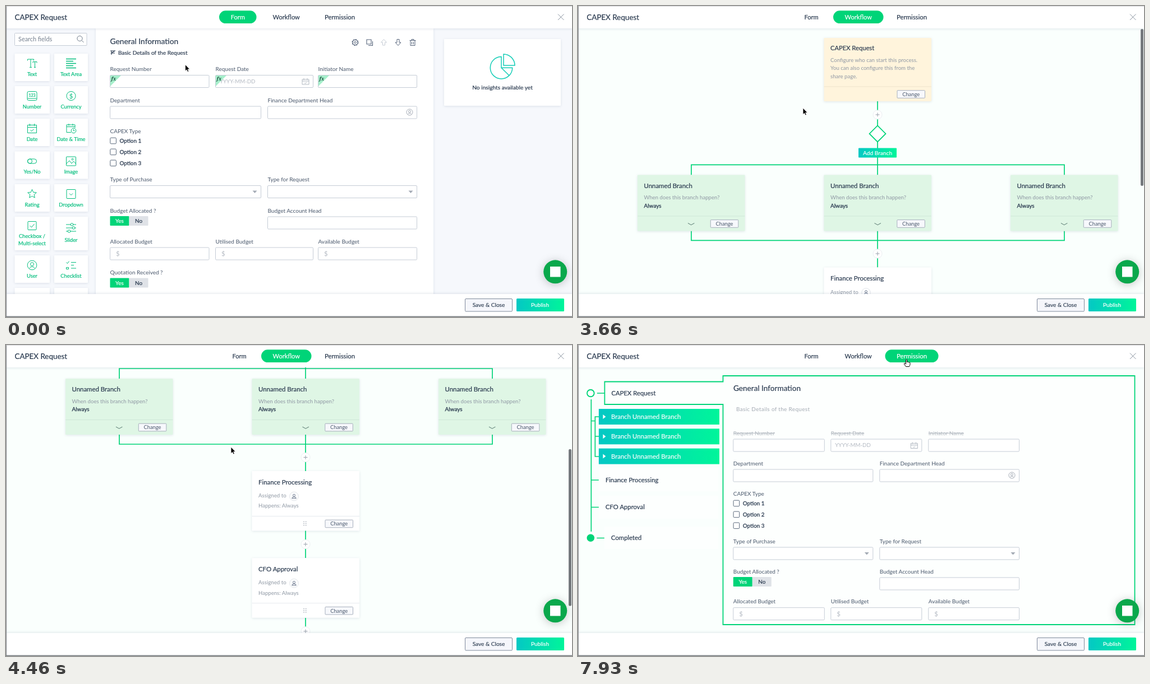
An HTML page that plays this animation: 1009 px wide and 555 px high, repeating every 10000 ms.

```html
<!DOCTYPE html>
<html lang="en">
<head>
<meta charset="utf-8">
<title>CAPEX Request</title>
<style>
html, body { margin: 0; width: 100%; height: 100%; overflow: hidden; background: #fff; }
svg { display: block; width: 1009px; height: 555px; }
text { font-family: Lato, "Open Sans", sans-serif; }
.sh { filter: drop-shadow(0 1px 2px rgba(60, 80, 110, .14)); }
</style>
</head>
<body>
<svg id="stage" viewBox="0 0 1009 555" xmlns="http://www.w3.org/2000/svg"></svg>
<script>
const INK = '#2b3b50', LABEL = '#4a586c', GREY = '#8f98a4', EDGE = '#c5ccd6',
      GREEN = '#00d478', ICON = '#00bd7c';

// ---- drawing helpers ----
const rect = (x, y, w, h, fill, stroke = 'none', r = 0, more = '') =>
  `<rect x="${x}" y="${y}" width="${w}" height="${h}" rx="${r}" fill="${fill}" stroke="${stroke}" ${more}/>`;
const path = (d, stroke, w = 1, fill = 'none') =>
  `<path d="${d}" stroke="${stroke}" stroke-width="${w}" fill="${fill}"/>`;
const circle = (x, y, r, fill, stroke = 'none', w = 1) =>
  `<circle cx="${x}" cy="${y}" r="${r}" fill="${fill}" stroke="${stroke}" stroke-width="${w}"/>`;
const at = (x, y, s, more = '') => `<g transform="translate(${x} ${y})" ${more}>${s}</g>`;
// y is the middle of the capitals; o.b is extra weight, o.mid centres
const text = (x, y, s, size, fill = INK, o = {}) =>
  `<text x="${x}" y="${y + size * .36}" font-size="${size}" fill="${fill}"` +
  (o.b ? ` stroke="${fill}" stroke-width="${o.b}"` : '') +
  (o.mid ? ' text-anchor="middle"' : '') + (o.more ? ' ' + o.more : '') + `>${s}</text>`;
const group = (id, s, more = '') => `<g id="${id}" ${more}>${s}</g>`;

const calendar = c => path('M-6 -4H6V5H-6ZM-6 -1H6M-3 -6V-3M3 -6V-3M-2 2L-.5 3.3L2 1', c, .9);
const person = (c, r) => circle(0, 0, r, 'none', c) + circle(0, -r * .22, r * .36, 'none', c) +
  path(`M${-r * .6} ${r * .68}Q0 ${-r * .1} ${r * .6} ${r * .68}`, c);

// ---- form ----
const field = (x, y, w) => rect(x, y, w, 22, '#fff', EDGE, 1.5);
const fx = (x, y) => path(`M${x + .5} ${y + .5}h19l-19 19z`, 'none', 0, '#a6efcb') +
  `<text x="${x + 2}" y="${y + 9.5}" font-size="8.5" font-weight="700" font-style="italic" fill="#1d5040" style="font-family:'Noto Serif',serif">fx</text>`;
const toggle = (x, y) => rect(x, y, 34, 17, GREEN, 'none', 1) + rect(x + 34, y, 34, 17, '#dfe2e7', 'none', 1) +
  text(x + 17, y + 8.5, 'Yes', 10, '#fff', { mid: 1, b: .2 }) + text(x + 51, y + 8.5, 'No', 10, INK, { mid: 1, b: .2 });

function formBody(thirds, halves, rows, locked) {
  const label = (x, y, s, strike) => text(x, y, s, 10, strike ? '#b0b6be' : LABEL,
    strike ? { more: 'text-decoration="line-through"' } : {});
  const caret = (x, y) => path(`M${x - 4} ${y - 2}h8l-4 4.5z`, 'none', 0, '#a3aab4');
  const [a, b] = halves, left = a[0];
  let s = '';
  thirds.forEach(([x, w], i) => {
    const y = rows[0] + 11;
    s += label(x, rows[0], ['Request Number', 'Request Date', 'Initiator Name'][i], locked) + field(x, y, w);
    if (i == 1) s += text(x + 7.5, y + 11, 'YYYY-MM-DD', 9.7, '#b4bac3') + at(x + w - 13.5, y + 11.5, calendar('#aab1bb'));
    if (!locked) s += fx(x, y);
    s += label(x, rows[5], ['Allocated Budget', 'Utilised Budget', 'Available Budget'][i]) +
      field(x, rows[5] + 11, w) + text(x + 10.5, rows[5] + 22, '$', 11.5, '#b4bac3');
  });
  halves.forEach(([x, w], i) => {
    s += label(x, rows[1], ['Department', 'Finance Department Head'][i]) + field(x, rows[1] + 11, w) +
      label(x, rows[3], ['Type of Purchase', 'Type for Request'][i]) + field(x, rows[3] + 11, w) +
      caret(x + w - 11, rows[3] + 22);
  });
  s += at(b[0] + b[1] - 13, rows[1] + 21.5, person('#a3aab4', 5.5));
  s += label(left, rows[2], 'CAPEX Type');
  [17.5, 37.4, 57.3].forEach((d, i) => {
    s += rect(left + .3, rows[2] + d - 5.3, 10.6, 10.6, '#fff', '#59677a', 1.5) +
      text(left + 17, rows[2] + d - .3, 'Option ' + (i + 1), 9.9, INK, { b: .28 });
  });
  s += label(left, rows[4], 'Budget Allocated ?') + toggle(left, rows[4] + 10) +
    label(b[0], rows[4], 'Budget Account Head') + field(b[0], rows[4] + 11, b[1]);
  if (rows[6]) s += label(left, rows[6], 'Quotation Received ?') + toggle(left, rows[6] + 10);
  return s;
}

const tools = [
  ['Text', path('M-8 -5V-7.5H3V-5M-2.5 -7.5V7M-4.5 7H-.5M1.5 -1V-3H8.5V-1M5 -3V7M3.5 7H6.5', ICON)],
  ['Text Area', path('M-9 -8H9M-9 -4H4M-9 0H9M-9 4H4M-9 8H9', ICON, 1.5)],
  ['Number', rect(-8.5, -8, 17, 16, 'none', ICON, 2.5) + path('M-8 4.5H8', ICON) + text(0, -1.5, '123', 7, ICON, { mid: 1, b: .2 })],
  ['Currency', circle(0, 0, 8, 'none', ICON) + text(0, 0, '$', 11.5, ICON, { mid: 1 })],
  ['Date', path('M-8 -6H8V8H-8ZM-8 -2H8M-4 -8.5V-4.5M4 -8.5V-4.5M-3 3L-.5 5L3 1', ICON)],
  ['Date &amp; Time', path('M0 7H-8V-6.5H7V-1M-8 -3H7M-4 -8.5V-5M3 -8.5V-5', ICON) + circle(4.5, 4, 4.3, '#fff', ICON) + path('M4.5 1.5V4H6.5', ICON)],
  ['Yes/No', rect(-8, -4, 16, 8, 'none', ICON, 4) + circle(-4, 0, 4, 'none', ICON)],
  ['Image', rect(-8.5, -8, 17, 16, 'none', ICON, 1) + path('M-8 4L-3 -1L1 4L4.5 0L8 4', ICON) + circle(2.5, -3.5, 1.5, 'none', ICON)],
  ['Rating', path(Array.from({ length: 10 }, (_, i) => {
    const r = i % 2 ? 3.8 : 8.2, a = i * Math.PI / 5;
    return (i ? 'L' : 'M') + (r * Math.sin(a)).toFixed(2) + ' ' + (-r * Math.cos(a)).toFixed(2);
  }).join('') + 'Z', ICON)],
  ['Dropdown', rect(-8, -8, 16, 16, 'none', ICON, 1) + path('M-3 -1L0 2L3 -1', ICON)],
  ['Checkbox /|Multi-select', rect(-7.5, -7.5, 15, 15, 'none', ICON, 1) + path('M-4 0L-1 3L4 -3', ICON)],
  ['Slider', path('M-9 -6H-1M4 -6H9M-9 0H2M7 0H9M-9 6H-6M-1 6H9', ICON) + circle(1.5, -6, 2.3, 'none', ICON) + circle(4.5, 0, 2.3, 'none', ICON) + circle(-3.5, 6, 2.3, 'none', ICON)],
  ['User', person(ICON, 8.3)],
  ['Checklist', path('M-8.5 -5L-6.5 -3L-3.5 -7M0 -5H9M-8.5 4H-4.5V7H-8.5ZM0 5.5H9M0 0H5', ICON)]
];

function formPage() {
  let s = rect(0, 40, 1009, 475, '#f6f8fc') + rect(160, 40, 602, 475, '#fff', 'none', 0, 'class="sh"');
  s += rect(15.5, 48.5, 128.5, 22, '#fff', EDGE, 1) + text(22, 59.5, 'Search fields', 10.9, '#747f8e') +
    circle(131.5, 58, 4.6, 'none', '#6c7888') + path('M135 61.5L138.5 65', '#6c7888');
  const tops = [85, 143, 201, 259.5, 318, 376, 445, 503];
  tops.forEach((y, r) => [[15.5, 62.5], [86, 60]].forEach(([x, w], c) => {
    s += rect(x, y, w, r == 5 ? 60 : 49, '#fff', 'none', 1, 'class="sh"');
    const item = tools[r * 2 + c];
    if (!item) return;
    const cx = c ? 116 : 46.5, lines = item[0].split('|'), tall = r == 5 && c;
    s += at(cx, y + (tall ? 20 : r == 5 ? 16 : 17.5), item[1]);
    lines.forEach((l, i) => s += text(cx, y + (tall ? 41.5 : r == 5 ? 34.5 : 36.3) + i * 13.3, l, 9.3, ICON, { mid: 1, b: .2 }));
  }));
  s += text(185.5, 63.5, 'General Information', 13.8, INK, { b: .2 }) +
    path('M186 80H194L188 84H194M188 80V87', INK, 1.1) +
    text(200, 83, 'Basic Details of the Request', 10.1, INK, { b: .2 });
  s += at(622.5, 65, circle(0, 0, 4.6, 'none', '#55637a', 1.2) + circle(0, 0, 1.8, 'none', '#55637a') +
    `<circle r="5.4" fill="none" stroke="#55637a" stroke-width="1.2" stroke-dasharray="2.1 2.14"/>`);
  s += at(648, 65, path('M-5 -5H3V3H-5ZM5.5 -2V5.5H-2', '#55637a', 1.1)) +
    at(673.5, 65, path('M-2 5V0H-5L0 -5.5L5 0H2V5Z', '#c6ccd5')) +
    at(699, 65, path('M-2 -5.5V0H-5L0 5.5L5 0H2V-5.5Z', '#55637a')) +
    at(725, 65, path('M-5.5 -3.5H5.5M-2 -3.5V-5.5H2V-3.5M-4 -3.5V5.5H4V-3.5M-1.5 -1V3.5M1.5 -1V3.5', '#55637a'));
  s += formBody([[185.5, 176.5], [373.5, 174], [556.5, 176]], [[185.5, 269], [466.5, 266]],
    [112.5, 168, 223, 309.5, 365, 420, 475.5]);
  s += rect(781, 59, 208, 119, '#fff', 'none', 1, 'class="sh"') +
    path('M883 90.5A19.7 19.7 0 1 0 902.7 110.2H883ZM883 110.2L897 124M887 86V106H907A20 20 0 0 0 887 86Z', '#14cdb6', 1.5) +
    text(885, 145, 'No insights available yet', 10.2, INK, { mid: 1, b: .2 });
  return s + group('caret', rect(22, 54, 1, 11, '#222'));
}

// ---- workflow ----
const change = (x, y) => rect(x, y - 6.8, 49.5, 13.6, '#f7f8fc', '#a7afbc', 1) +
  text(x + 24.7, y, 'Change', 9.4, LABEL, { mid: 1 });
const plus = y => circle(534, y, 8, '#fff', '#eceff2') + path(`M530.5 ${y}h7M534 ${y - 3.5}v7`, '#9aa2ad');

function flowPage() {
  const box = (x, y, h, fill, div, line) => rect(x, y, 191.5, h, fill, 'none', 1, 'class="sh"') +
    path(`M${x} ${div}h191.5`, line);
  let s = path('M534 170V214M534 243V302M202 302V284H867V302M202 402V419H867V402M534 402V467M534 573V622M534 729V777', GREEN, 1.7);
  s += path('M534 214L548.5 228.5L534 243L519.5 228.5Z', GREEN, 1.7, '#fff') +
    rect(500, 254, 68, 17, 'url(#teal)', 'none', 1) + text(534, 262.5, 'Add Branch', 10.2, '#fff', { mid: 1, b: .15 });
  s += box(438.5, 57.5, 113, '#fff4dc', 144.5, '#efe4cc') + text(450, 76, 'CAPEX Request', 11.2, INK, { b: .2 });
  ['Configure who can start this process.', 'You can also configure this from the', 'share page.']
    .forEach((l, i) => s += text(450, 97.3 + i * 14.2, l, 9.6, GREY));
  s += change(569, 158);
  [106, 438.5, 771].forEach(x => {
    s += box(x, 302, 100, '#dff6e5', 375.5, '#cfe8d8') + text(x + 11.5, 321.3, 'Unnamed Branch', 11.4, INK, { b: .2 }) +
      text(x + 11.5, 342.5, 'When does this branch happen?', 9.6, GREY) +
      text(x + 11.5, 356.5, 'Always', 10, INK, { b: .3 }) +
      path(`M${x + 90} 388l5.7 3.2l5.7 -3.2`, '#6b8a80', 1.1) + change(x + 130.3, 389);
  });
  [['Finance Processing', 467], ['CFO Approval', 622.2]].forEach(([name, y]) => {
    s += box(438.5, y, 106.5, '#fff', y + 80.5, '#e6e9ee') + text(450, y + 19.8, name, 11.4, INK, { b: .2 }) +
      text(450, y + 43.8, 'Assigned to', 9.7, GREY) + text(450, y + 62, 'Happens: Always', 9.6, GREY) +
      at(513.5, y + 45, circle(0, 0, 7.8, '#fff', '#dfe3e8') + circle(0, -1.7, 2, 'none', '#66738a') +
        path('M-3.8 3.8Q-3.5 1 0 1Q3.5 1 3.8 3.8Z', '#66738a'));
    for (let i = 0; i < 6; i++) s += rect(530.5 + i % 2 * 3.5, y + 89.8 + (i >> 1) * 3.2, 1.3, 1.3, '#8a93a0');
    s += change(569, y + 94);
  });
  s += [194.5, 442.5, 597.5, 752.8].map(plus).join('');
  return s + rect(503.5, 777, 61.5, 20.5, '#fff', GREEN, 10.2) + text(534, 787, 'Completed', 10.3, '#00b96c', { mid: 1, b: .2 });
}

// ---- permission ----
function permPage() {
  let s = path('M258.5 65.5V55H992.5V499H258.5V106H47.5V65.5Z', GREEN, 1.8, '#fdfffe');
  s += rect(37, 220, 213, 41, '#fdfffe') + rect(37, 269, 213, 41, '#fdfffe') + rect(47, 324, 203, 40, '#fdfffe');
  s += path('M23.5 97V333M34 86H47M23 135.5H30.5M37 128H30.5V199H37M30.5 163H37M23 241H37M23 289.5H37M33 344.5H47', GREEN, 1.7);
  s += circle(22.5, 86, 11, '#fff') + circle(22.5, 86, 6.3, '#fff', GREEN, 1.9) +
    circle(22.5, 344.3, 11, '#fff') + circle(22.5, 344.3, 6.8, GREEN);
  [114, 149.3, 184.6].forEach(y => s += rect(37, y, 215, 28, 'url(#teal)') +
    path(`M44.5 ${y + 10}l5 4l-5 4z`, 'none', 0, '#fff') + text(59, y + 14, 'Branch Unnamed Branch', 11.4, '#fff', { b: .15 }));
  [['CAPEX Request', 59.5, 85.5], ['Finance Processing', 49, 240.5], ['CFO Approval', 49, 289], ['Completed', 59, 344]]
    .forEach(([l, x, y]) => s += text(x, y, l, 11.3, INK, { b: .2 }));
  s += text(277, 77, 'General Information', 13.6, INK, { b: .2 }) +
    text(282, 114.5, 'Basic Details of the Request', 10, '#a3aab3', { more: 'letter-spacing=".32"' });
  return s + formBody([[276.8, 162.5], [450.8, 162], [624.8, 161.7]], [[276.8, 249], [537.8, 248.7]],
    [157, 211, 265, 350, 404, 457.7], true);
}

// ---- frame around the pages ----
const tabs = [['Form', 380, 66.5, 416, 11.1], ['Workflow', 455, 89.5, 499.7, 11.1], ['Permission', 547.5, 95, 595, 11.4]];
const chrome = rect(0, 0, 1009, 40, '#fff', 'none', 0, 'class="sh"') +
  text(15.5, 20, 'CAPEX Request', 13.4, INK, { b: .2 }) + path('M984 14.5L994.5 25M994.5 14.5L984 25', '#8a94a0') +
  tabs.map(([l, x, w, cx, size], i) =>
    group('off' + i, text(cx, 19.7, l, size, INK, { mid: 1, b: .2 })) +
    group('on' + i, rect(x, 8.3, w, 22.8, GREEN, 'none', 11.4) + text(x + w / 2, 19.7, l, size, '#fff', { mid: 1, b: .2 }))).join('') +
  rect(0, 514, 1009, 41, '#fff', 'none', 0, 'style="filter:drop-shadow(0 -1px 2px rgba(60,80,110,.14))"') +
  rect(818.5, 522.5, 84, 22.5, '#f5f6fb', '#7f8a9b', 1.5) + text(860.5, 533.5, 'Save &amp; Close', 10.1, INK, { mid: 1, b: .15 }) +
  rect(910, 522, 85, 23, 'url(#teal)', 'none', 1.5) + text(952, 533.5, 'Publish', 10.1, '#fff', { mid: 1, b: .2 }) +
  `<g style="filter:drop-shadow(0 2px 8px rgba(0,0,0,.22))">${circle(979.2, 474.3, 21, '#0aa84c')}</g>` +
  rect(970, 465, 18.5, 18.5, '#fff') +
  path('M.6 0V555', '#8d9094', 1.2) + path('M0 .3H1009', '#b9bcbf', .7) + path('M0 554.2H1009', '#7d8185', 1.5);

const arrow = path('M0 0V11.6L2.6 9.2L4.3 13L6.3 12.1L4.6 8.5H8.1Z', '#fff', .8, '#000');
const hand = path('M-1 .8Q0 -.6 1 .8V5Q2.2 4 3 5.2Q4.4 4.4 5 5.8Q6.5 5.2 6.5 6.8V9Q6.2 11 5 13H-1L-4 8.6Q-4.5 6.6 -2.6 7L-1 8.6Z', '#000', 1, '#fff');

document.getElementById('stage').innerHTML =
  `<defs><linearGradient id="teal"><stop stop-color="#04c8c4"/><stop offset="1" stop-color="#00f59a"/></linearGradient>
  <clipPath id="view"><rect y="40" width="1009" height="474"/></clipPath></defs>` +
  rect(0, 0, 1009, 555, '#fafffd') +
  `<g clip-path="url(#view)">${group('form', formPage()) + group('flow', flowPage()) + group('perm', permPage())}</g>` +
  group('bar', rect(1003, 40.6, 5, 280, '#75797d', 'none', 2.5)) + chrome +
  group('mouse', group('arrow', arrow) + group('hand', hand));

// ---- motion ----
const ease = {
  out: p => 1 - (1 - p) * (1 - p),
  both: p => (1 - Math.cos(Math.PI * p)) / 2
};
// rows: [start, end, easing, ...values reached]
const track = (t, from, rows) => {
  let now = from;
  for (const [a, b, e, ...to] of rows) {
    if (t <= a) break;
    const p = ease[e](Math.min(1, (t - a) / (b - a)));
    now = now.map((v, i) => v + (to[i] - v) * p);
  }
  return now;
};
const moves = [
  [1140, 1660, 'both', 486.5, 44], [1660, 2000, 'out', 495.5, 19.5],
  [2940, 3200, 'both', 401, 182],
  [5530, 6600, 'both', 586.5, 26.5],
  [7455, 7456, 'both', 586.5, 25.5], [7925, 7926, 'both', 585.5, 25.5]
];
const scrolls = [[3642, 4467, 'both', 242], [4540, 4934, 'both', 301]];
const $ = id => document.getElementById(id);
const show = (id, o) => $(id).setAttribute('opacity', Math.max(0, Math.min(1, +o)));
const TICK = 1000 / 15, LOOP = 10000, start = performance.now();

function draw(now) {
  // the picture advances 15 times a second
  const elapsed = Math.max(0, now - start) % LOOP;
  const t = Math.floor((elapsed + 8) / TICK) * TICK % LOOP;
  const page = t < 2260 ? 0 : t < 6860 ? 1 : 2;
  show('form', page == 0);
  show('flow', page == 1 ? (t - 2335) / 190 : 0);
  show('perm', page == 2 ? (t - 6860) / 200 : 0);
  show('caret', t > 190 && t < 730 || t > 1190 && t < 1790);
  for (let i = 0; i < 3; i++) { show('on' + i, i == page); show('off' + i, i != page); }

  const [s] = track(t, [0], scrolls);
  $('flow').setAttribute('transform', `translate(0 ${-s})`);
  $('bar').setAttribute('transform', `translate(0 ${s * .6})`);
  show('bar', t < 3650 ? 0 : (5800 - t) / 250);

  const [x, y] = track(t, [319.5, 104.5], moves);
  $('mouse').setAttribute('transform', `translate(${x} ${y})`);
  show('hand', y < 31);
  show('arrow', y >= 31);
  requestAnimationFrame(draw);
}
draw(start);
</script>
</body>
</html>
```
